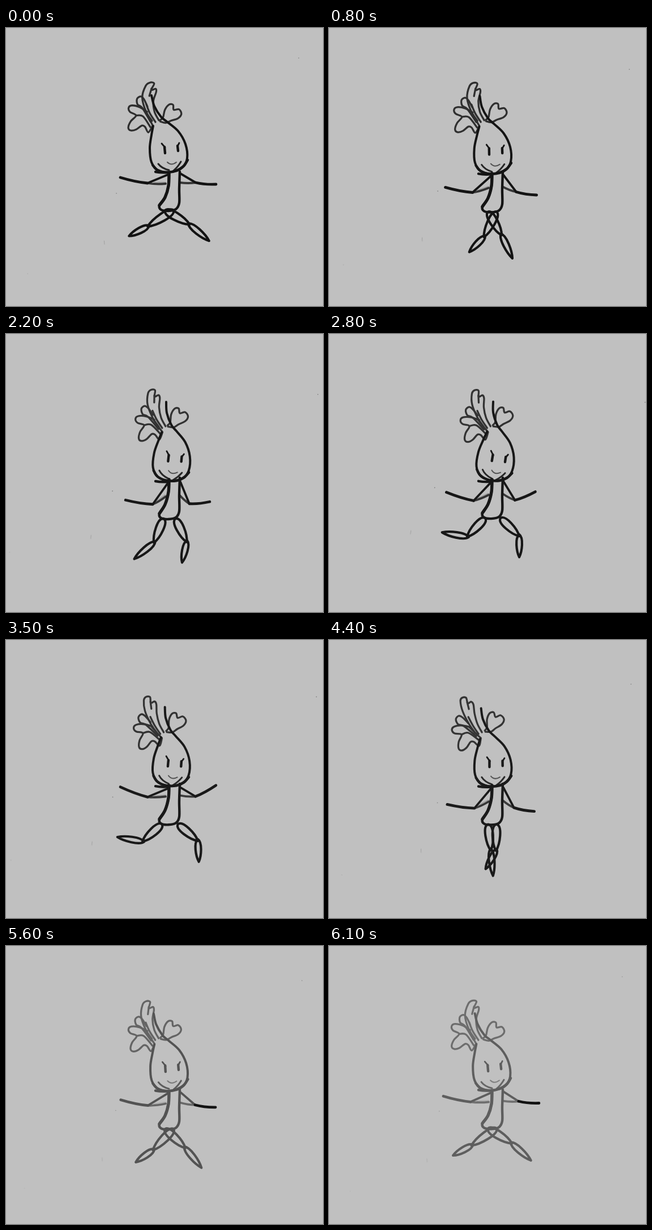
Recreate the animation shown at these times as an HTML page. Size 560 by 491 pixels, loop 6200 ms.

```html
<!DOCTYPE html>
<html lang="en">
<head>
<meta charset="utf-8">
<title>Onion run</title>
<style>
html, body { margin: 0; width: 100%; height: 100%; overflow: hidden; background: #c0c0c0; }
svg { display: block; width: 560px; height: 491px; }
path { fill: none; stroke-linecap: round; stroke-linejoin: round; }
#ink { filter: blur(.45px); }
</style>
</head>
<body>
<svg viewBox="0 0 560 491">
  <g id="ink">
    <g id="legs" stroke-width="4.2"></g>
    <g id="body" stroke-width="4.4"></g>
    <g id="arms" stroke-width="3.8"></g>
    <g id="head" stroke-width="4"></g>
    <g id="hair" stroke-width="3.3" opacity=".84"></g>
  </g>
</svg>
<script>
const LOOP = 6200, STEP = 100, DARK = '#131313';
const $ = id => document.getElementById(id);
const mix = (a, b, u) => a + (b - a) * u;
const xy = p => p.map(v => v.toFixed(2)).join(' ');

// Straight-line motion through [time, value] keys
const track = (...keys) => t => {
  const i = keys.findIndex(k => k[0] > t);
  const [t0, a] = keys[i - 1], [t1, b] = keys[i];
  return mix(a, b, (t - t0) / (t1 - t0));
};

// stride: -1 legs apart, 0 together, 1 back leg kicked up
const stride = track([0, -1], [1600, 0], [2800, 1], [3500, 1.1], [4400, -0.1], [5100, -0.6], [LOOP, -1]);
const drop = track([0, 0], [1600, 1], [2800, 0.62], [3500, 0.1], [4400, 0.7], [LOOP, 0]);
const tilt = track([0, 0], [2800, 14.5], [4400, 5.1], [LOOP, 0]);
const sway = track([0, 0], [1600, 0.38], [4400, 1], [LOOP, 0]);
const grey = track([0, 19], [4400, 26], [5100, 72], [LOOP, 96]);

// Smooth curve through a string of "x,y" points or a list
const pts = s => s.split(' ').map(p => p.split(',').map(Number));
function curve(list) {
  let d = 'M' + xy(list[0]);
  for (let i = 0; i < list.length - 1; i++) {
    const a = list[i], b = list[i + 1], p = list[i - 1] || a, q = list[i + 2] || b;
    d += 'C' + xy([a[0] + (b[0] - p[0]) / 6, a[1] + (b[1] - p[1]) / 6]) +
      ' ' + xy([b[0] - (q[0] - a[0]) / 6, b[1] - (q[1] - a[1]) / 6]) + ' ' + xy(b);
  }
  return d;
}

function lens(a, b, wa, wb, blunt) {
  const dx = b[0] - a[0], dy = b[1] - a[1], l = Math.hypot(dx, dy);
  const at = (u, w) => xy([a[0] + dx * u - dy / l * w, a[1] + dy * u + dx / l * w]);
  return `M${xy(a)}C${at(blunt, wa)} ${at(0.75, wb)} ${xy(b)}C${at(0.75, -wb)} ${at(blunt, -wa)} ${xy(a)}Z`;
}

function polar(p, deg, len) {
  const r = deg * Math.PI / 180;
  return [p[0] + Math.sin(r) * len, p[1] + Math.cos(r) * len];
}

function spin([x, y], c, deg) {
  const r = deg * Math.PI / 180, cs = Math.cos(r), sn = Math.sin(r);
  return [c[0] + (x - c[0]) * cs - (y - c[1]) * sn, c[1] + (x - c[0]) * sn + (y - c[1]) * cs];
}

function add(group, attrs = {}) {
  const p = document.createElementNS('http://www.w3.org/2000/svg', 'path');
  for (const k in attrs) p.setAttribute(k, attrs[k]);
  $(group).appendChild(p);
  return p;
}
const set = (el, d) => el.setAttribute('d', d);
const fixed = (d, width, opacity = 1) => add('head', { d, 'stroke-width': width, opacity });

// Head, face and paper specks turn as one piece
fixed(curve(pts('257,119 262,138 274,157 285,166 304,182 317,205 320,230 312,245 292,254 269,252 257,237 254,212 257,189 260,173')), 4);
fixed(curve(pts('259,242 268,251 284,255 302,252 314,244 321,233')), 4.4);
fixed('M269 240Q275 248 288 251M309 236Q304 245 296 252', 3, 0.9);
fixed('M275 204L281 211M306 203L303 209', 2.8);
fixed('M280 210L281 221M303 208L304 217', 4.4);
fixed('M285 237Q292 244 301 237', 2, 0.65);
fixed('M517 53h.1M195 292h.1', 1.6, 0.4);
fixed('M173.5 376L174 382M38 434h.5', 1, 0.18);

const thighB = add('legs'), shinB = add('legs'), thighA = add('legs'), shinA = add('legs');
const torso = add('body'), spine = add('body', { 'stroke-width': 5.4 }), collar = add('body');
const smear = add('arms', { 'stroke-width': 5, opacity: 0.2 });
const newArm = () => ({ arm: add('arms'), pit: add('arms', { opacity: 0.8 }), fore: add('arms', { 'stroke-width': 4.8 }) });
const left = newArm(), right = newArm();

// Hair drawn swept back; each piece swings upright its own way
const swing = (c, deg, dx, dy) => (p, w) => {
  const q = spin(p, c, deg * w);
  return [q[0] + dx * w, q[1] + dy * w];
};
const bend = (p, w) => spin(p, [264, 165], 19 * w * ((165 - p[1]) / 66) ** 2);
const leafSwing = swing([217, 158], 21, 0, -18);
const hair = [
  [bend, '258,164 247,148 236,126 232,108 235,102 242,102 245,112 251,109 255,114 257,130 262,148 270,163'],
  [bend, '244,110 247,122'],
  [bend, '246,136 254,151 264,166'],
  [swing([258, 165], 20, -3, -5), '246,147 236,137 229,134 224,140 228,149 238,152 260,170'],
  [leafSwing, '250,154 235,151 221,153 217,159 222,165 234,167 229,180 229,192 235,195 243,190 250,180 256,180 265,187 268,174'],
  [leafSwing, '234,167 246,164 265,177'],
  [leafSwing, '248,154 258,164 268,173'],
  [swing([275, 160], 14, -3, 3), '275,160 279,154 279,140 284,129 291,128 294,136 303,133 309,140 305,149 294,156 286,162 276,162']
].map(([move, s]) => ({ move, list: pts(s), el: add('hair') }));

function drawLeg(thigh, shin, hip, a, len, b, shinLen) {
  const knee = polar(hip, a, len);
  set(thigh, lens(hip, knee, 11, 7, 0.05));
  set(shin, lens(polar(knee, b, -3), polar(knee, b, shinLen), 8, 5, 0.15));
}

function drawArm(part, shoulder, pit, elbow, hand) {
  const mid = (a, b, u, sag) => xy([mix(a[0], b[0], u), mix(a[1], b[1], u) + sag]);
  set(part.arm, `M${xy(shoulder)}L${xy(elbow)}`);
  set(part.pit, `M${xy(pit)}Q${mid(pit, elbow, 0.55, 2)} ${xy(elbow)}`);
  set(part.fore, `M${xy(elbow)}Q${mid(elbow, hand, 0.45, 2.5)} ${xy(hand)}`);
}

function draw(t) {
  const s = stride(t), d = drop(t), turn = tilt(t), k = sway(t), g = Math.round(grey(t));
  const kick = Math.max(s, 0), open = Math.max(-s, 0);
  const swingTo = (apart, mid, kicked) => mid + (apart - mid) * open + (kicked - mid) * kick;
  const bob = 5 * Math.max(d, 0.6 * kick), nod = Math.max(0, 3.5 * d * (1 - kick));
  $('ink').setAttribute('stroke', `rgb(${g},${g},${g})`);

  const hipY = 322 + bob;
  drawLeg(thighA, shinA, [281 - 5 * kick, hipY],
    swingTo(60, 0, -44), 46 + 4 * open, Math.max(-100, swingTo(50, 0, -101)), 45);
  drawLeg(thighB, shinB, [296 + 7 * kick, hipY],
    swingTo(-58, 5, 46), 46 + 8 * open, swingTo(-63, -26, 0), 37);

  const side = [[288, 257], [287, 279], [281, 299 + bob / 2], [271, 313 + bob]];
  set(spine, curve(side));
  set(torso, curve([...side, [274, 321 + bob], [287, 323 + bob], [300, 320 + bob], [306, 309 + bob], [306, 285], [307, 254]]));
  const cy = 254 + nod + 0.4 * turn;
  set(collar, `M264 ${cy}Q274 ${cy + 2} 286 ${cy + 1}`);

  const elbowL = [250 + 14 * d * d, 274 + 33 * d], elbowR = [335 - 17 * d * d, 273 + 33 * d];
  const pitY = 275 + 15 * d;
  drawArm(left, [286, 259 + bob], [282, pitY], elbowL,
    [elbowL[0] - 48, elbowL[1] - 10 + 14 * d ** 4 - 7 * kick]);
  drawArm(right, [308, 257 + bob], [307, pitY - 2], elbowR,
    [elbowR[0] + 36, elbowR[1] + 3 + 5 * d - 21 * kick]);
  set(smear, `M281 ${pitY - 1}L${mix(281, elbowL[0], 0.6)} ${mix(pitY, elbowL[1], 0.6)}`);

  // The part being edited stays dark while the rest fades
  shinA.style.stroke = t >= 4700 && t < 5600 ? DARK : '';
  right.fore.style.stroke = t >= 5600 ? DARK : '';

  $('head').setAttribute('transform', `translate(0 ${nod}) rotate(${turn} 272 249)`);
  $('hair').setAttribute('transform', `translate(${1.4 * turn - 9 * k + 2 * k * k} 0)`);
  for (const { move, list, el } of hair) set(el, curve(list.map(p => move(p, 1 - k))));
}

const start = performance.now();
function tick() {
  const t = (performance.now() - start) % LOOP;
  draw(Math.floor(t / STEP) * STEP);
  requestAnimationFrame(tick);
}
tick();
</script>
</body>
</html>
```
